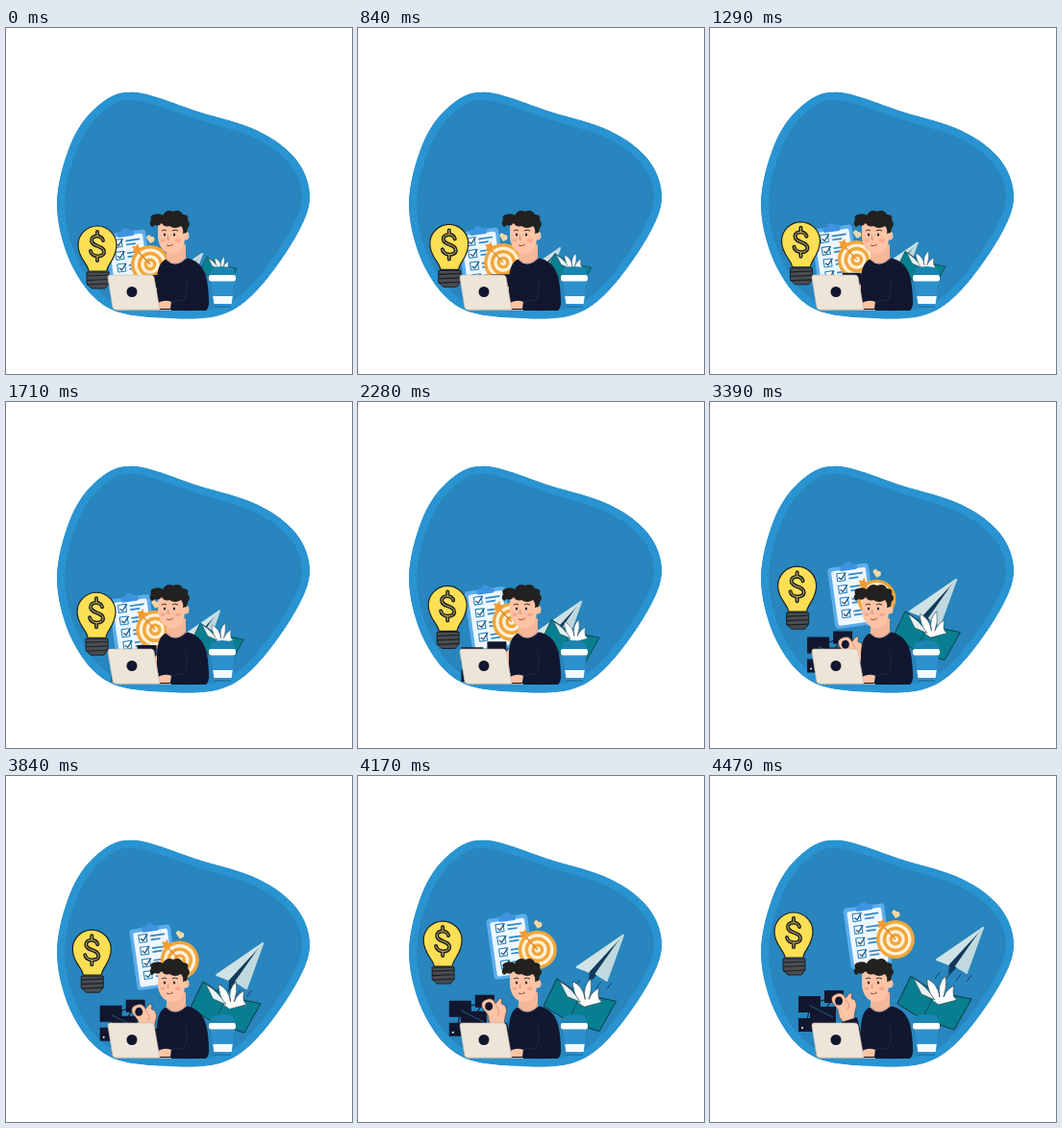
These frames come from a looping animation (360 px wide and 360 px high, 4500 ms). An HTML page with a canvas:

```html
<!DOCTYPE html>
<html>
<head>
<meta charset="utf-8">
<style>
html, body { margin: 0; width: 100%; height: 100%; overflow: hidden; background: #fff; }
canvas { display: block; width: 360px; height: 360px; }
</style>
</head>
<body>
<canvas id="stage"></canvas>
<script>
const canvas = document.getElementById('stage');
const density = window.devicePixelRatio || 1;
canvas.width = canvas.height = 360 * density;
const ctx = canvas.getContext('2d');
const LOOP = 4500, STEP = 30;
const NAVY = '#12172f', INK = '#1c2029', SKIN = '#fcc3a5', TEAL = '#087f91', PALE = '#cfe3e6';

function shape(d, fill, stroke, width = 1) {
  const path = new Path2D(d);
  if (fill) { ctx.fillStyle = fill; ctx.fill(path); }
  if (stroke) { ctx.strokeStyle = stroke; ctx.lineWidth = width; ctx.stroke(path); }
}
function line(d, color, width) {
  shape(d, null, color, width);
}
function oval(x, y, rx, ry, fill) {
  ctx.beginPath();
  ctx.ellipse(x, y, rx, ry, 0, 0, Math.PI * 2);
  ctx.fillStyle = fill;
  ctx.fill();
}
function box(x, y, w, h, r, fill) {
  ctx.beginPath();
  ctx.roundRect(x, y, w, h, r);
  ctx.fillStyle = fill;
  ctx.fill();
}
function at(x, y, draw, scale = 1, turn = 0) {
  ctx.save();
  ctx.translate(x, y);
  ctx.rotate(turn);
  ctx.scale(scale, scale);
  draw();
  ctx.restore();
}

// Closed smooth curve through a few key points.
function smoothPath(points) {
  const n = points.length, p = i => points[(i + n) % n];
  const path = new Path2D();
  path.moveTo(...p(0));
  for (let i = 0; i < n; i++) {
    const [a, b, c, d] = [p(i - 1), p(i), p(i + 1), p(i + 2)];
    path.bezierCurveTo(b[0] + (c[0] - a[0]) / 6, b[1] + (c[1] - a[1]) / 6,
      c[0] - (d[0] - b[0]) / 6, c[1] - (d[1] - b[1]) / 6, ...c);
  }
  path.closePath();
  return path;
}
const blobPath = smoothPath([[135, 67], [200, 87], [262, 107], [302, 137], [316, 176], [301, 218],
  [262, 272], [225, 298], [172, 302], [108, 292], [70, 250], [53, 185], [68, 119], [98, 79]]);

function blob() {
  ctx.save();
  ctx.clip(blobPath);
  ctx.fillStyle = '#2885bd';
  ctx.fill(blobPath);
  ctx.strokeStyle = '#2994d1';
  ctx.lineWidth = 16;
  ctx.stroke(blobPath);
  ctx.restore();
}

function clipboard() {
  box(-22, 0, 43, 64, 4, '#5cadec');
  box(-18.5, 4, 36, 57, 2, '#eef7ff');
  for (let i = 0; i < 4; i++) {
    at(0, 11 + i * 12.8, () => {
      shape('M-13-4h8v8h-8Z', '#fff', '#2784c0', 1.1);
      line('M-11.5 0L-9 2.4L-3.5-4', '#20577f', 1.3);
      line('M-1-1.5H14M-1 2.5H9', '#2e86c4', 1.7);
    });
  }
  box(-9, -1, 18, 6, 2, '#3f93e0');
  oval(0, -1, 4, 3, '#3f93e0');
}

function star(r) {
  ctx.beginPath();
  for (let i = 0; i < 10; i++) {
    const a = i * Math.PI / 5 + 0.4, d = i % 2 ? r / 2 : r;
    ctx.lineTo(d * Math.sin(a), d * Math.cos(a));
  }
  ctx.fillStyle = '#f29a2e';
  ctx.fill();
}

function target() {
  for (let i = 0; i < 6; i++) {
    const r = 20 - i * 3.4;
    oval(0, 0, r, r, i % 2 ? '#fff0d5' : '#f1a63b');
  }
  line('M-14-15L0 0', '#d9822b', 1.2);
  at(-14, -16, () => star(6));
  shape('M-4-28Q-2-33 1-29Q6-29 4-24L0-22Z', '#f8d7a2');
}

function bulb() {
  shape('M-9 27C-9 20-20 14-20 0A20 20 0 0 1 20 0C20 14 10 20 10 27Z', '#fcdf54', INK, 1.2);
  shape('M-11 28H12V40L8 45H-6L-11 40Z', '#4a4d4f', INK);
  line('M-11 32L12 31M-11 36.5L12 35.5M-11 41L12 40', INK, 1.2);
  ctx.lineCap = 'round';
  const dollar = 'M6-5C5-11-6-11-6-5C-6 2 7 0 7 7C7 13-6 13-7 6M0-10V-14M0 12V16';
  line(dollar, INK, 4);
  line(dollar, '#f5d34c', 0.9);
  ctx.lineCap = 'butt';
}

function plane() {
  shape('M0 0L-48 33L-35 38Z', PALE, PALE, 2);
  shape('M0 0L-35 38L-36 50L-27 41Z', '#12395b');
  shape('M0 0L-28 40L-17 47Z', '#bfd9de', '#bfd9de', 2);
  for (let i = 0; i < 4; i++) {
    at(-50 + i * 11, 53 + i, () => line('M0 0L5-7', '#173e60', 0.9));
  }
}

function book() {
  shape('M-24-28L0-12L39-4L21 28L-12 17L-38 1Z', TEAL, '#103643');
  line('M0-8L-13 19', '#075b6c', 1.2);
  shape('M-1-2Q-8-19-7-25Q4-20 6-6Q3-20 12-28Q14-18 10-6Q13-14 21-18Q18-6 24-3L5 2Z', '#fff', '#29464f', 0.7);
  shape('M-21-25Q-8-18 1-3L-13-9Z', '#e9f2f2', '#29464f', 0.7);
}

function diagram() {
  line('M104 238L128 230L117 248L100 260L104 238', NAVY, 1.1);
  shape('M92 229h23v17h-23ZM119 223h20v13h-20ZM104 240h27v17h-27ZM92 252h17v14h-17Z', NAVY);
  line('M104 239L128 251', '#2c76a2', 0.7);
  oval(96, 262, 1, 1, '#fff');
}

function raisedHand() {
  shape('M139 257Q133 251 133 243L127 235Q125 229 131 227Q138 224 141 231L145 226Q149 225 147 231L151 233Q154 238 151 245L149 260Z', SKIN, '#33272a', 0.6);
  oval(134, 234, 4, 4.5, NAVY);
  line('M141 232L145 239L143 243', '#cf8e78', 0.8);
  shape('M137 256L153 251L163 290H142Z', NAVY);
}

function man() {
  shape('M168 240C160 242 157 252 157 264V294H208Q212 291 211 281C210 259 207 243 187 239Z', NAVY);
  shape('M167 228V240Q176 250 187 239V225Z', '#f6b799');
  line('M166 240Q176 251 188 239', '#e3c9c0', 1);
  oval(187, 216, 3.5, 4.5, SKIN);
  shape('M158 202H186V219Q185 235 173 235Q160 234 158 218Z', SKIN);
  shape('M152 207Q148 204 151 200Q149 195 154 194Q160 192 163 195Q167 188 174 191Q181 188 184 194Q191 194 189 200Q193 204 189 208L188 213L184 214Q185 209 182 206Q176 210 170 206Q165 208 162 203Q159 207 155 205Z', '#22211f');
  oval(165, 215, 1.1, 1.5, INK);
  oval(175, 215, 1.1, 1.5, INK);
  line('M162 211Q165 209 167 211M173 211Q176 209 179 211', INK, 0.9);
  line('M169 216L168 220L170 220', '#c57c68', 0.8);
  line('M167 226Q171 228 174 225', '#9e4a42', 1);
  oval(163, 221, 2.5, 1.8, '#f8a98f');
  oval(179, 221, 3, 1.8, '#f8a98f');
  line('M187 260Q190 276 185 283L169 285', '#293047', 0.7);
  shape('M158 286Q166 282 172 285L171 292H159Z', SKIN);
}

function laptop() {
  shape('M108 257H151Q153 257 154 259L160 293H114Q112 293 111 291L106 260Q106 257 108 257Z', '#eee5d9', '#c5bbae', 0.6);
  oval(131, 274.5, 5.5, 5.5, NAVY);
  line('M114 293.5H172', '#b9afa6', 1.2);
}

function cup() {
  shape('M212 257L214 250Q225 246 236 250L239 257Z', '#1c84b0');
  shape('M213 261H238L234 290H217Z', '#2e91cf');
  box(211, 257, 28, 6.5, 2, '#fff');
  shape('M215.2 279H235.8L234.7 287H216.5Z', '#f4fafc');
  line('M217 290H234', '#1a5378', 0.8);
}

function render(time) {
  const u = time / (LOOP - STEP);
  const away = 1 - u ** 2.2, far = 1 - u ** 1.55;
  ctx.setTransform(density, 0, 0, density, 0, 0);
  ctx.lineJoin = 'round';
  ctx.fillStyle = '#fff';
  ctx.fillRect(0, 0, 360, 360);
  blob();
  at(160 - 36 * away, 135 + 77 * away, clipboard, 1, -0.14);
  at(193 - 43 * away, 170 + 76 * away, target);
  at(87 + 8 * away, 162 + 64 * away, bulb);
  at(284 - 80 * far, 158 + 77 * far, plane);
  at(233 - 24 * away + 12 * (1 - u), 236 + 16 * away, book, 1 - 0.5 * (1 - u) ** 1.2);
  ctx.save();
  ctx.beginPath();
  ctx.rect(0, 0, 360, 291);
  ctx.clip();
  at(20 * away, 34 * away, diagram);
  at(15 * away, 40 * away, raisedHand);
  ctx.restore();
  man();
  laptop();
  cup();
}

const start = performance.now();
function tick() {
  const elapsed = (performance.now() - start) % LOOP;
  render(Math.floor(elapsed / STEP) * STEP);
  requestAnimationFrame(tick);
}
tick();
</script>
</body>
</html>
```
